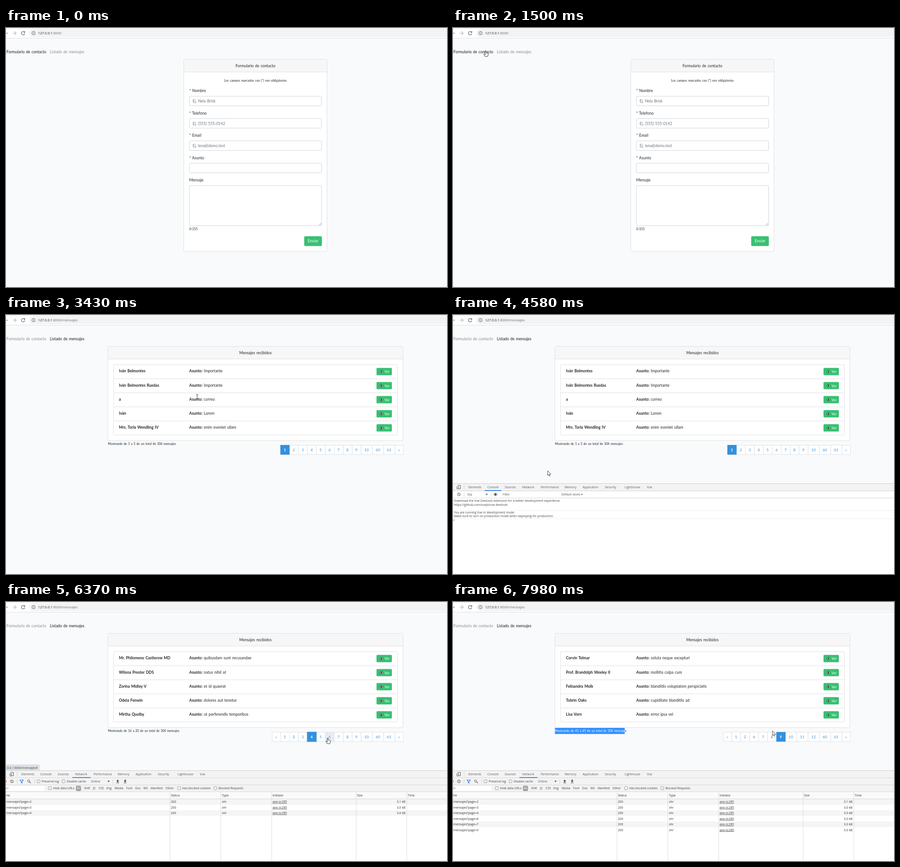
An HTML page that plays this animation: 976x574 px, repeating every 8 s.

```html
<!DOCTYPE html>
<html lang="es">
<head>
<meta charset="utf-8">
<title>Formulario de contacto</title>
<style>
html, body { margin: 0; width: 100%; height: 100%; overflow: hidden; background: #f8fafc; }
svg { display: block; }
text { white-space: pre; }
.page { font-family: Lato, "Open Sans", sans-serif; word-spacing: .05em; }
.ui { font-family: "Open Sans", "Noto Sans", sans-serif; }
</style>
</head>
<body>
<svg id="stage" width="976" height="574" viewBox="0 0 976 574">
  <rect width="976" height="574" fill="#f8fafc"/>
  <g id="scene"></g>
  <path id="cursor" stroke-linejoin="round" stroke-linecap="round"/>
</svg>
<script>
const LOOP = 8000;
const GREEN = '#38c172', BLUE = '#3490dc', INK = '#212529', EDGE = '#dfdfdf';
const scene = document.getElementById('scene');
const cursor = document.getElementById('cursor');

// Cursor stops: time, x, y of the hot spot
const stops = [
  [100, 806, 506], [890, 139, 71], [910, 139, 71], [1000, 135, 52], [1100, 135, 52],
  [1300, 60, 52], [1400, 60, 52], [1490, 72, 50], [1620, 72, 50], [1700, 124, 51],
  [1750, 124, 51], [1850, 126, 11], [1980, 159, 11], [2090, 155.5, 24], [2380, 155.5, 24],
  [2480, 60, 52], [2700, 60, 52], [2850, 127, 49], [3110, 127, 49], [3430, 423, 181],
  [3990, 423, 181], [4790, 166, 379], [4880, 166, 379], [5400, 640, 301], [5720, 640, 301],
  [5900, 659, 301], [5980, 659, 301], [6130, 678, 301], [6220, 678, 301], [6340, 712, 301],
  [6500, 712, 301], [6690, 735, 301], [6760, 735, 301], [6900, 775, 302], [6980, 775, 302],
  [7280, 229, 286], [7300, 229, 286], [7500, 378, 297], [7610, 353, 288], [7790, 353, 288],
  [7870, 450, 263], [7980, 707, 286]
];

// Views: time, list page (0 is the form)
const views = [[0, 0], [1040, 1], [1340, 0], [1740, 1], [2520, 0], [2880, 1],
  [5690, 2], [5950, 3], [6180, 4], [6490, 6], [6740, 7], [6960, 9]];

const messages = {
  1: ['Iván Belmontes|Importante', 'Iván Belmontes Ruedas|Importante', 'a|correo', 'Iván|Lorem', 'Mrs. Torla Wendling IV|enim eveniet ullam'],
  2: ['Dr. Melvana Trusk|quia omnis dolor', 'Orlo Penwick|sit autem rerum', 'Sabrela Dunmore|vel nihil ipsam', 'Kester Holbin|et quod minus', 'Ms. Ruvena Platt|aut illum earum'],
  3: ['Varo Limbeck|rerum sed facere', 'Delisa Corwell PhD|nemo quo velit', 'Tavin Marsk|ut odio magnam', 'Ilda Fronsby|harum eos nobis', 'Mr. Pardo Quellin|id neque labore'],
  4: ['Mr. Philomeno Castlerow MD|quibusdam sunt recusandae', 'Wilona Prester DDS|natus nihil at', 'Zorina Midley V|et id quaerat', 'Odela Fenwin|dolores aut tenetur', 'Mirtha Quolby|ut perferendis temporibus'],
  6: ['Fenna Drostel|ea culpa totam', 'Rulo Estwick IV|non iusto porro', 'Calvia Thornby|qui modi soluta', 'Dr. Hestor Vanley|sint ab quidem', 'Jorla Pemsey|et optio veniam'],
  7: ['Bruno Alquist DVM|quam unde animi', 'Selda Morrowin|ad fuga officia', 'Ektor Lunby|sed nulla atque', 'Prof. Amabel Stroud|vero enim saepe', 'Nerio Castin|in alias beatae'],
  9: ['Corvin Telmar|soluta neque excepturi', 'Prof. Brandolph Wexley II|mollitia culpa cum', 'Felisandra Molk|blanditiis voluptatem perspiciatis', 'Tobrin Oaks|cupiditate blanditiis ad', 'Lisa Vorn|error ipsa vel']
};

// Drawing helpers; text is placed by the middle of its capitals
const text = (x, mid, s, size, fill, extra = '') =>
  `<text x="${x}" y="${mid + size * .36}" font-size="${size}" fill="${fill}" ${extra}>${s}</text>`;
const rect = (x, y, w, h, fill, stroke = 'none', r = 0, extra = '') =>
  `<rect x="${x}" y="${y}" width="${w}" height="${h}" fill="${fill}" stroke="${stroke}" rx="${r}" ${extra}/>`;
const line = (d, stroke, w = 1, fill = 'none') =>
  `<path d="${d}" stroke="${stroke}" stroke-width="${w}" fill="${fill}"/>`;
const MIDDLE = 'text-anchor="middle"', END = 'text-anchor="end"', BOLD = 'font-weight="700"';
const rowY = i => 110 + i * 31.2;

function card(x, w, h, title) {
  return rect(x, 69.5, w, h, '#fff', EDGE, 2.3)
    + rect(x + .5, 70, w - 1, 27, '#f7f7f7')
    + line(`M${x} 97.5h${w}`, EDGE)
    + text(552, 83.5, title, 8.5, INK, MIDDLE);
}

function nav(list) {
  const tint = on => on ? '#191919' : '#8b8d8f';
  return text(1, 52.7, 'Formulario de contacto', 8.5, tint(!list))
    + text(97, 52.7, 'Listado de mensajes', 8.5, tint(list));
}

function form() {
  const fields = [['* Nombre', 'Ej. Nela Brisk'], ['* Telefono', 'Ej. (555) 555-0142'],
    ['* Email', 'Ej. lena@demo.test'], ['* Asunto', '']];
  return card(393.5, 317, 425.5, 'Formulario de contacto')
    + text(552, 116.7, 'Los campos marcados con (*) son obligatorios', 6.75, INK, MIDDLE)
    + fields.map(([label, hint], i) => {
      const y = i * 49.5;
      return text(405.5, 139.4 + y, label, 8.5, INK)
        + rect(405.9, 151.2 + y, 292.6, 21.2, '#fff', '#ced4da', 2)
        + text(413, 162.2 + y, hint, 8.5, '#6c757d');
    }).join('')
    + text(405.5, 337.4, 'Mensaje', 8.5, INK)
    + rect(405.9, 349.2, 292.6, 89, '#fff', '#ced4da', 2)
    + line('M692.5 437l5-5M695.5 437l2-2', '#777', .7)
    + text(405.5, 445.7, '0/255', 6.75, INK)
    + rect(660, 461.5, 39, 21.7, GREEN, 'none', 2.3)
    + text(679.4, 472.4, 'Enviar', 8.5, '#fff', MIDDLE);
}

const eye = (x, y) =>
  line(`M${x - 4} ${y}Q${x} ${y - 5.4} ${x + 4} ${y}Q${x} ${y + 5.4} ${x - 4} ${y}Z`, '#1c2b22', 1, '#fff')
  + `<circle cx="${x}" cy="${y}" r="1.6" fill="#111"/>`;

function row(entry, i) {
  const [name, subject] = entry.split('|');
  const y = rowY(i);
  return (i ? line(`M238.5 ${y}h628`, EDGE) : '')
    + text(250, y + 14.3, name, 8.45, INK, BOLD)
    + text(405.5, y + 14.3, `<tspan ${BOLD}>Asunto:</tspan> ${subject}`, 8.5, INK)
    + rect(820, y + 7.2, 34, 16.2, GREEN, 'none', 2)
    + eye(830.5, y + 15.5)
    + text(837.8, y + 15.6, 'Ver', 7.5, '#fff');
}

function pageCells(page) {
  const range = (a, b) => Array.from({ length: b - a + 1 }, (_, i) => a + i);
  const near = page <= 7 ? range(1, 10) : [1, 2, ...range(page - 3, page + 3)];
  const labels = [...(page > 1 ? ['«'] : []), ...near, 60, 61, '»'];
  const width = s => typeof s === 'string' ? 18.6 : s > 9 ? 25 : 19.8;
  let x = 879 - labels.reduce((sum, s) => sum + width(s), 0);
  return labels.map(s => {
    const cell = { s, x, w: width(s) };
    x += cell.w;
    return cell;
  });
}

function pager(page, hover, ring) {
  const cells = pageCells(page);
  const plain = cells.map(({ s, x, w }) =>
    rect(x + .5, 288.5, w, 20.6, s === hover ? '#e9ecef' : '#fff', '#dee2e6')
    + text(x + w / 2, 299, s, 8.4, s === hover ? '#6c93b2' : BLUE, MIDDLE)).join('');
  const { x, w } = cells.find(c => c.s === page);
  return plain
    + (ring ? rect(x - 1.2, 286.8, w + 3, 24, BLUE, 'none', 1.5, 'opacity=".3"') : '')
    + rect(x, 288, w + .6, 21.5, BLUE)
    + text(x + w / 2, 299, page, 8.4, '#fff', MIDDLE + ' ' + BOLD);
}

function list(s) {
  const from = s.page * 5 - 4;
  const total = `Mostrando de ${from} a ${from + 4} de un total de 304 mensajes`;
  const caption = fill => text(225.5, 286, total, 6.72, fill);
  const marked = s.marked > 0
    ? `<svg x="225.5" y="279" width="${s.marked}" height="13.4" viewBox="225.5 279 ${s.marked} 13.4">`
      + rect(225, 279, 160, 14, '#3390ff') + caption('#fff') + '</svg>' : '';
  return card(225.5, 653, 209, 'Mensajes recibidos')
    + rect(238, 110, 628.4, 156, '#fff', EDGE, 2.3)
    + messages[s.page].map(row).join('')
    + caption(INK) + marked
    + pager(s.page, s.hover, s.ring);
}

function browserBar(s) {
  const grey = '#5f6368';
  const path = s.page ? '/mensajes' : '';
  return rect(0, 0, 976, 22, '#fff') + rect(0, 0, 976, 1, '#e4e6e9')
    + line('M0 22.5h976', '#dcdfe2')
    + line('M-4 11.5h8M0 7.5l-4 4l4 4', grey, 1.2)
    + line('M14.5 11.5h8M18.7 7.5l4 4l-4 4', '#b3b6b9', 1.1)
    + line('M41 9.2A3.8 3.8 0 1 0 41.6 12.5M41.6 7.2v2.8h-2.8', grey, 1.2)
    + (s.focus ? rect(50.5, 2.8, 960, 17, '#fff', '#7aa9ee', 8.5)
      : rect(51, 2.5, 960, 17.5, '#f1f3f4', 'none', 8.7))
    + `<circle cx="61" cy="11.3" r="3.7" fill="none" stroke="${grey}"/>`
    + line('M61 10.8v2.4M61 8.9v1', grey, 1)
    + (s.picked > 0 ? rect(125.5, 5, s.picked, 12.5, '#a8c8f8') : '')
    + text(70.8, 11.4, `127.0.0.1<tspan fill="#6b7075">:8000${path}</tspan>`, 7.6, '#202124');
}

const noEntry = (x, y) =>
  `<circle cx="${x}" cy="${y}" r="3.2" fill="none" stroke="#555"/>` + line(`M${x - 2.2} ${y - 2.2}l4.4 4.4`, '#555');
const check = (x, y, label) =>
  rect(x - 3.2, y - 3.2, 6.4, 6.4, '#fff', '#767676', 1, 'stroke-width=".8"') + text(x + 7, y, label, 6.7, '#444');
const labels = (y, items, fill = '#555') => items.map(([s, x]) => text(x, y, s, 6.7, fill)).join('');

function consolePane() {
  const grey = '#444';
  return line('M0 405.5h976M24.5 393v10M84.5 393v10', '#ccc', .8)
    + noEntry(13, 397.5)
    + labels(397.5, [['top', 32], ['Filter', 110], ['Default levels ▾', 240]])
    + line('M72 396.3h5l-2.5 3.2z', 'none', 0, '#555')
    + eye(94, 397.5)
    + line('M0 433.5h976M0 451.5h976', '#eee')
    + labels(412, [['Download the Vue Devtools extension for a better development experience:', 2]], grey)
    + labels(421, [['https://github.com/vuejs/vue-devtools', 2]], grey)
    + labels(438, [['You are running Vue in development mode.', 2]], grey)
    + labels(446, [['Make sure to turn on production mode when deploying for production.', 2]], grey)
    + line('M1 453.2l2 1.6l-2 1.6', '#367cf1', 1);
}

function requests(pages) {
  const columns = [363, 475.5, 588, 775, 887];
  const head = [['Name', -10], ['Status', 365], ['Type', 478], ['Initiator', 590], ['Size', 777], ['Time', 889]];
  return rect(0, 421, 976, 15.5, '#fafafa') + labels(428.8, head, '#333')
    + pages.map((p, i) => {
      const y = 443 + i * 12.42;
      return (i % 2 ? '' : rect(0, y - 6.2, 976, 12.4, '#f5f5f5'))
        + labels(y, [[`mensajes?page=${p}`, 1], ['200', 365], ['xhr', 478], ['1', 975]], '#333')
        + text(590, y, 'app.js:285', 6.7, '#333', 'text-decoration="underline"')
        + text(884, y, (i ? '3.0' : '3.1') + ' kB', 6.7, '#333', END);
    }).join('')
    + line('M0 436.5h976', '#ccc', .8)
    + line(columns.map(x => `M${x} 421V574`).join(''), '#d4d4d4', .8);
}

function networkPane(s) {
  const types = [['XHR', 173], ['JS', 192.5], ['CSS', 205], ['Img', 222], ['Media', 240.5], ['Font', 266],
    ['Doc', 286], ['WS', 304], ['Manifest', 320], ['Other', 353]];
  const busy = s.calls.length > 0;
  const empty = text(552, 490.7, 'Recording network activity…', 7.8, '#777', MIDDLE)
    + text(552, 507, `Perform a request or hit <tspan ${BOLD}>Ctrl</tspan> + <tspan ${BOLD}>R</tspan> to record the reload.`, 7.5, '#777', MIDDLE)
    + text(552, 523.5, 'Learn more', 7.8, '#1155cc', MIDDLE + ' text-decoration="underline"');
  return rect(0, 390, 976, 30.5, '#f3f3f3')
    + line('M0 405.5h976M0 420.5h976', '#d0d0d0', .8)
    + line('M24.5 393v10M63.5 393v10M236.5 393v10', '#ccc', .8)
    + rect(-3, 394.5, 4, 6, '#d93025', 'none', 3)
    + noEntry(13, 397.5)
    + line('M31 394.5h7.4l-2.7 3.4v3.4l-2-1v-2.4z', '#1a73e8', 1.1)
    + `<circle cx="50" cy="396.7" r="2.5" fill="none" stroke="#555"/>` + line('M52 398.7l2.8 2.8', '#555', 1.2)
    + check(72, 397.5, 'Preserve log') + check(127.3, 397.5, 'Disable cache')
    + text(188, 397.5, 'Online', 6.7, '#555')
    + line('M224.5 396h5l-2.5 3.5z', 'none', 0, '#555')
    + line('M244 397.2l3.2-3.6l3.2 3.6h-2v2.6h-2.4v-2.6z', 'none', 0, '#555')
    + line('M260.5 396.2h2v-2.6h2.4v2.6h2l-3.2 3.6z', 'none', 0, '#555')
    + line('M244 401h6.4M260.5 401h6.4', '#555', 1)
    + rect(-10, 407.3, 95.5, 11, '#fff', busy ? 'none' : '#5b9bf0')
    + text(6.5, 413, 'Filter', 6.7, '#888', END)
    + check(97, 412.7, 'Hide data URLs')
    + rect(154.7, 407.2, 11.4, 11.8, '#a0a0a0', 'none', 3)
    + text(160.4, 413, 'All', 6.7, '#fff', MIDDLE)
    + labels(413, types, '#444')
    + check(383, 412.7, 'Has blocked cookies') + check(463.3, 412.7, 'Blocked Requests')
    + (busy ? requests(s.calls) : empty);
}

function devtools(s) {
  if (!s.tool) return '';
  const tabs = [['Elements', 34], ['Console', 76], ['Sources', 114.5], ['Network', 153], ['Performance', 194],
    ['Memory', 247], ['Application', 287], ['Security', 336], ['Lighthouse', 380], ['Vue', 429]];
  const net = s.tool === 'network';
  return rect(0, 373, 976, 201, '#fff') + rect(0, 373, 976, 17, '#f3f3f3')
    + line('M0 373.5h976M0 389.8h976', '#ccc', .9)
    + line('M24.5 376v11', '#ccc', .8)
    + line('M10 377.5h6.5v7.5h-3.5M8.8 380.5h3.6v5h-3.6z', '#555', 1)
    + rect(net ? 147 : 70, 388.3, net ? 40 : 37, 1.6, '#1a73e8')
    + labels(381.7, tabs, '#5a5a5a')
    + (net ? networkPane(s) : consolePane())
    + (s.bubble ? rect(-5, 360.5, 79, 13, '#dee1e6', '#cdd0d4', 1.5, 'stroke-width=".6"')
      + text(70, 367.2, '127.0.0.1:8000/mensajes#', 6.6, '#444', END) : '');
}

function cursorAt(t) {
  if (t < stops[0][0]) return null;
  const i = stops.findIndex(p => p[0] > t);
  if (i < 0) return stops[stops.length - 1].slice(1);
  const [t0, x0, y0] = stops[i - 1], [t1, x1, y1] = stops[i];
  const u = (t - t0) / (t1 - t0), k = u * u * (3 - 2 * u);
  return [x0 + (x1 - x0) * k, y0 + (y1 - y0) * k];
}

function hoveredPage(page, x, y) {
  if (!page || y < 288 || y > 309.5) return null;
  const cell = pageCells(page).find(c => x >= c.x && x < c.x + c.w);
  return cell ? cell.s : null;
}

function cursorKind(s, x, y) {
  const inside = (l, t, r, b) => x >= l && x <= r && y >= t && y <= b;
  if (inside(0, 45, 88, 60) || inside(97, 45, 174, 60)) return 'hand';
  if (s.hover !== null) return 'hand';
  if (inside(68, 3, 976, 19)) return 'beam';
  if (!s.page) {
    const box = [0, 1, 2, 3].some(i => inside(406, 151 + i * 49.5, 698, 172 + i * 49.5));
    return box || inside(406, 349, 698, 438) ? 'beam' : 'arrow';
  }
  const words = [0, 1, 2, 3, 4].some(i =>
    inside(250, rowY(i) + 7, 342, rowY(i) + 21) || inside(406, rowY(i) + 7, 480, rowY(i) + 21));
  return words || inside(225, 279, 380, 298) ? 'beam' : 'arrow';
}

const shapes = {
  arrow: ['M0 0V10L2.3 7.9L3.9 11.5L5.4 10.8L3.8 7.3H7Z', '#fff', '#222', .8],
  hand: ['M-1 .8Q0-.6 1 .8V5Q2 4.3 2.8 5.3Q3.8 4.7 4.4 5.8Q5.6 5.4 5.8 6.8V9.5L4.8 13H-1.2L-3.8 8.6Q-4 7.2-2.6 7.6L-1 9Z', '#fff', '#222', .9],
  beam: ['M-2-5Q0-5 0-4Q0-5 2-5M0-4.5V4.5M-2 5Q0 5 0 4Q0 5 2 5', 'none', '#222', .9]
};

function stateAt(t, at) {
  const past = views.filter(v => v[0] <= t);
  const page = past[past.length - 1][1];
  const clamp = (v, max) => Math.max(0, Math.min(max, v));
  return {
    page,
    focus: t >= 1850 && t < 2500,
    picked: t < 1850 || t >= 2500 ? 0 : t >= 1980 ? 34 : clamp(at[0] - 125.5, 34),
    tool: t < 4350 ? '' : t < 4890 ? 'console' : 'network',
    calls: past.map(v => v[1]).filter(p => p > 1),
    bubble: t >= 5590 && t < 7060,
    hover: at && hoveredPage(page, at[0], at[1]),
    ring: t >= 5690 && t < 7300,
    marked: t < 7300 ? 0 : t >= 7480 ? 154.5 : clamp(at[0] - 225.5, 154.5)
  };
}

let lastKey = '';
function draw(t) {
  const at = cursorAt(t);
  const s = stateAt(t, at);
  const key = JSON.stringify(s);
  if (key !== lastKey) {
    lastKey = key;
    scene.innerHTML = `<g class="page">${nav(s.page > 0)}${s.page ? list(s) : form()}</g>`
      + `<g class="ui">${browserBar(s)}${devtools(s)}</g>`;
  }
  cursor.style.display = at ? '' : 'none';
  if (!at) return;
  const [d, fill, stroke, width] = shapes[cursorKind(s, ...at)];
  cursor.setAttribute('d', d);
  cursor.setAttribute('fill', fill);
  cursor.setAttribute('stroke', stroke);
  cursor.setAttribute('stroke-width', width);
  cursor.setAttribute('transform', `translate(${at[0]} ${at[1]})`);
}

const start = performance.now();
function tick() {
  draw((performance.now() - start) % LOOP);
  requestAnimationFrame(tick);
}
tick();
</script>
</body>
</html>
```
